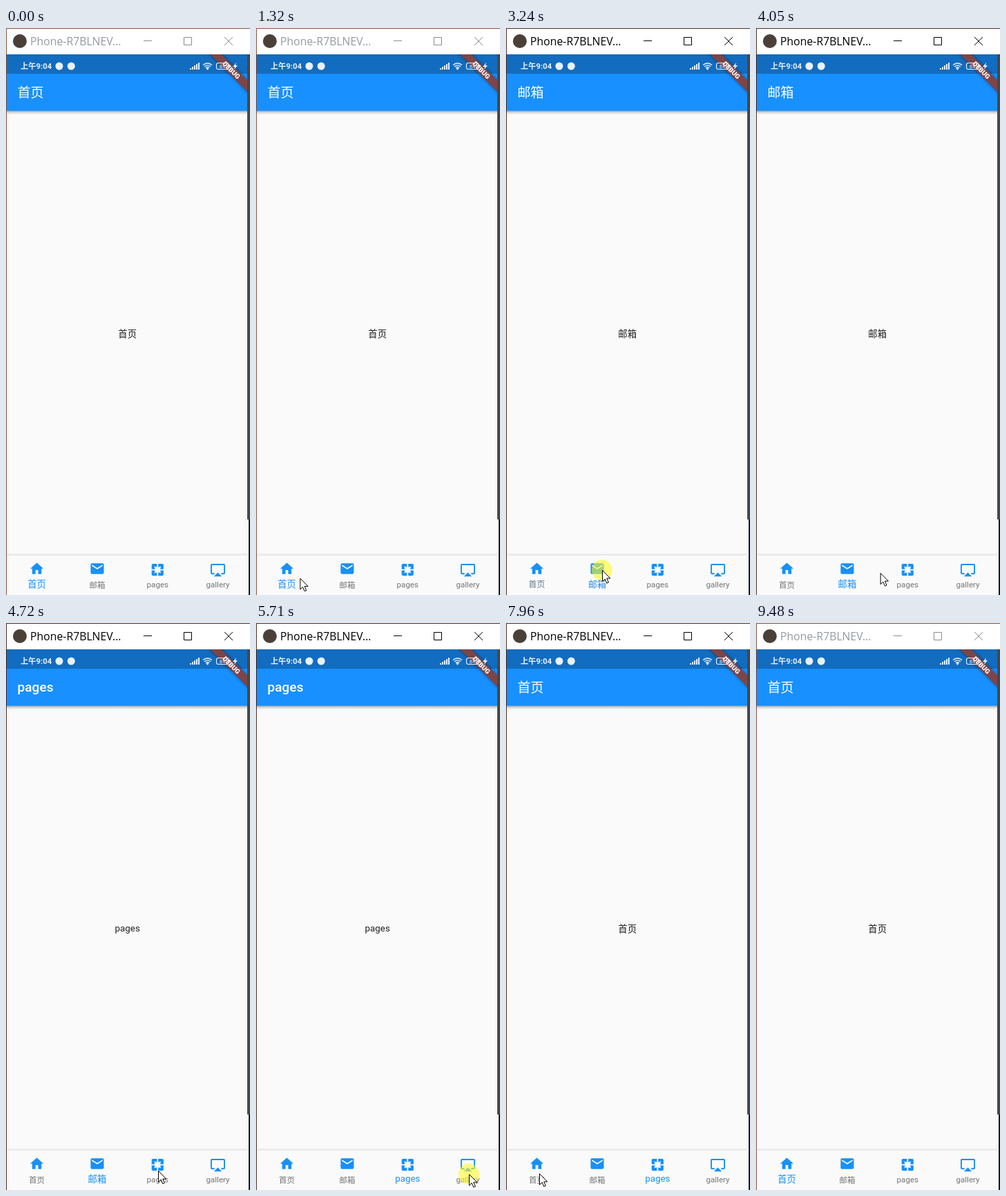
An HTML page for the animation above (9550 ms loop, 353 px wide and 818 px high).

```html
<!DOCTYPE html>
<html lang="zh">
<head>
<meta charset="utf-8">
<style>
  html, body { margin: 0; width: 100%; height: 100%; overflow: hidden; background: #fafafa; }
  svg { display: block; width: 100%; height: 100%; font-family: Roboto, "Noto Sans CJK SC", "Noto Sans CJK", sans-serif; }
  #caption { font-family: "Open Sans", "Noto Sans", sans-serif; }
  .mid { text-anchor: middle; }
</style>
</head>
<body>
<svg viewBox="0 0 353 818" xmlns="http://www.w3.org/2000/svg">
  <defs>
    <clipPath id="phone"><rect x="1" y="38" width="348" height="780"/></clipPath>
    <clipPath id="navClip"><rect x="1" y="761" width="349" height="57"/></clipPath>
    <linearGradient id="drop" x2="0" y2="1">
      <stop offset="0" stop-color="#000" stop-opacity=".36"/>
      <stop offset=".4" stop-color="#000" stop-opacity=".12"/>
      <stop offset="1" stop-color="#000" stop-opacity="0"/>
    </linearGradient>
    <linearGradient id="rise" x2="0" y2="1">
      <stop offset="0" stop-color="#000" stop-opacity="0"/>
      <stop offset="1" stop-color="#000" stop-opacity=".09"/>
    </linearGradient>
    <filter id="soft" x="-20%" y="-80%" width="140%" height="260%"><feGaussianBlur stdDeviation="2"/></filter>
  </defs>

  <rect width="353" height="818" fill="#fafafa"/>

  <!-- window frame -->
  <rect width="353" height="38" fill="#fff"/>
  <circle cx="20" cy="19" r="10" fill="#4a4038"/>
  <text id="caption" x="35" y="25" font-size="15.8">Phone-R7BLNEV...</text>
  <path id="buttons" fill="none" d="M199 18.5h12M257.5 13.5h11v11h-11zM316 13l12 12M328 13l-12 12"/>
  <rect x="349" y="38" width="4" height="671" fill="#45474a"/>
  <rect x="351" y="709" width="2" height="109" fill="#1c1a1b"/>
  <path id="frame" fill="none" d="M.5 818V.5H353"/>

  <!-- app bar -->
  <rect x="1" y="38" width="348" height="28" fill="#126cbf"/>
  <rect x="1" y="66" width="348" height="53.5" fill="#1890ff"/>
  <rect x="1" y="119.5" width="348" height="6" fill="url(#drop)"/>
  <text id="title" x="16.5" y="100" font-size="19.1" fill="#fff"></text>
  <text id="body" class="mid" x="175.7" y="446" font-size="13.4" fill="#212121"></text>

  <g clip-path="url(#phone)">
    <g transform="translate(349 38) rotate(45)">
      <rect x="-50" y="26.6" width="100" height="11.4" fill="#000" opacity=".5" filter="url(#soft)"/>
      <rect x="-50" y="26.6" width="100" height="11.4" fill="#7d4548"/>
      <text class="mid" y="35.8" font-size="9.7" font-weight="900" fill="#fff">DEBUG</text>
    </g>
  </g>

  <!-- status bar -->
  <g fill="#e9f2fb">
    <text x="21" y="59" font-size="11.3" font-weight="700">上午9:04</text>
    <circle cx="77" cy="55" r="5.5"/>
    <circle cx="94.3" cy="55" r="5.5"/>
    <path d="M266 58h2v2h-2zM269 56h2v4h-2zM272 54h2v6h-2zM275 52h2v8h-2zM278 50h2v10h-2z"/>
    <path d="M333 50l-5 6h3l-1 4 5-6h-3z"/>
    <path d="M323 53h1.5v4H323z"/>
    <circle cx="291.5" cy="59" r="1.4"/>
    <text class="mid" x="313" y="58" font-size="7.5">84</text>
  </g>
  <g fill="none" stroke="#e9f2fb" stroke-width="1.4">
    <path d="M285 53.5q6.5-5.5 13 0M287 55.7q4.500-3.700 9 0M289 57.700q2.500-2 5 0" />
    <rect x="304.500" y="50.500" width="17.500" height="9" rx="2.500" stroke-width="1.100"/>
  </g>

  <!-- bottom navigation -->
  <rect x="1" y="757" width="348" height="4" fill="url(#rise)"/>
  <rect x="1" y="761" width="349" height="57" fill="#fafafa"/>
  <circle id="ripple" cx="44.500" cy="790" fill="#000" clip-path="url(#navClip)"/>
  <g id="tabs"></g>

  <circle id="halo" r="15" fill="#fffa28" opacity=".6"/>
  <path id="cursor" d="M.5.5v16l3.700-3.500 2.600 6 2.600-1.100-2.600-5.900h5z" fill="#fff" stroke="#000"/>
</svg>

<script>
const LOOP = 9550;
const BLUE = [24, 144, 255], GREY = [117, 117, 117];
const $ = id => document.getElementById(id);

const tabs = [
  { text: '首页', x: 44.6, y: 780, d: 'M10 20v-6h4v6h5v-8h3L12 3 2 12h3v8z' },
  { text: '邮箱', x: 132, y: 780, d: 'M20 4H4c-1.1 0-2 .9-2 2v12c0 1.1.9 2 2 2h16c1.1 0 2-.9 2-2V6c0-1.1-.9-2-2-2zm0 4l-8 5-8-5V6l8 5 8-5z' },
  { text: 'pages', x: 219.3, y: 781.6, latin: true, d: 'M3 5v6h5L7 7l4 1V3H5c-1.1 0-2 .9-2 2zm5 8H3v6c0 1.1.9 2 2 2h6v-5l-4 1zm9 4l-4-1v5h6c1.1 0 2-.9 2-2v-6h-5zm2-14h-6v5l4-1-1 4h5V5c0-1.1-.9-2-2-2z' },
  { text: 'gallery', x: 306.5, y: 781.6, latin: true, d: 'M6 22h12l-6-6zM21 3H3c-1.1 0-2 .9-2 2v12c0 1.1.9 2 2 2h4v-2H3V5h18v12h-4v2h4c1.1 0 2-.9 2-2V5c0-1.1-.9-2-2-2z' }
];

// [time, tab] and [press, release]
const pages = [[0, 0], [3100, 1], [4720, 2], [6040, 3], [7030, 2], [7950, 0]];
const presses = [[1710, 1990], [2970, 3300], [4400, 4580], [5620, 5840], [6710, 6900], [7700, 7880]];

// [time, x, y] of the pointer tip
const path = [
  [650, 190, 814], [1450, 54, 792], [2000, 54, 792], [2250, 75, 786], [2510, 100, 784],
  [2710, 100, 784], [2960, 139, 782], [3710, 139, 782], [4390, 220, 790], [5180, 220, 790],
  [5600, 308, 795], [6250, 308, 795], [6700, 196, 798], [7330, 196, 798],
  [7690, 48, 794], [7960, 48, 794], [8290, 224, 818]
];

const clamp = v => Math.min(1, Math.max(0, v));
const mix = (a, b, k) => a + (b - a) * k;
const ease = k => k * k * (3 - 2 * k);
const ramp = (t, from, to) => clamp((t - from) / (to - from));

function set(el, attrs) {
  for (const key in attrs) el.setAttribute(key, attrs[key]);
}

function add(name, attrs) {
  const el = document.createElementNS('http://www.w3.org/2000/svg', name);
  set(el, attrs);
  return $('tabs').appendChild(el);
}

for (const tab of tabs) {
  add('path', {
    d: tab.d, fill: '#1890f5',
    transform: `translate(${tab.x} ${tab.y}) scale(.955) translate(-12 -12)`
  });
  tab.label = add('text', { class: 'mid', x: tab.x });
  tab.label.textContent = tab.text;
}

function pointer(t) {
  const i = path.findIndex(p => p[0] > t);
  if (i < 1) return path[0].slice(1);
  const [t0, x0, y0] = path[i - 1], [t1, x1, y1] = path[i];
  const k = ease(ramp(t, t0, t1));
  return [mix(x0, x1, k), mix(y0, y1, k)];
}

function drawTabs(t) {
  const n = pages.filter(p => p[0] <= t).length - 1;
  const [start, now] = pages[n];
  const before = n ? pages[n - 1][1] : now;
  const k = n ? ease(ramp(t, start + 30, start + 190)) : 1;

  $('title').textContent = $('body').textContent = tabs[now].text;
  set($('title'), { 'font-weight': tabs[now].latin ? 500 : 400, y: tabs[now].latin ? 99.3 : 100 });
  set($('body'), { y: tabs[now].latin ? 445 : 446 });

  tabs.forEach((tab, i) => {
    const on = i === now ? k : i === before ? 1 - k : 0;
    set(tab.label, {
      y: tab.latin ? mix(806.8, 806, on) : mix(807.6, 807, on),
      'font-size': mix(11.6, 13.4, on),
      fill: `rgb(${GREY.map((c, j) => Math.round(mix(c, BLUE[j], on)))})`
    });
  });
}

function render(t) {
  const active = t >= 1710 && t < 9480;
  set($('caption'), { fill: active ? '#000' : '#949ba3' });
  set($('buttons'), { stroke: active ? '#000' : '#8c8c8c' });
  set($('frame'), { stroke: active ? '#4a2c22' : '#80503c' });

  drawTabs(t);
  set($('ripple'), {
    r: mix(6, 34, ease(ramp(t, 1800, 2150))),
    opacity: t < 1800 ? 0 : .06 * (1 - ramp(t, 2260, 2510))
  });

  const [x, y] = pointer(t);
  const shown = t >= 650 && t < 8290;
  const pressed = presses.some(([a, b]) => t >= a && t < b);
  set($('cursor'), { transform: `translate(${x} ${y})`, visibility: shown ? 'visible' : 'hidden' });
  set($('halo'), { cx: x, cy: y, visibility: pressed ? 'visible' : 'hidden' });
}

const begin = performance.now();
function tick() {
  render((performance.now() - begin) % LOOP);
  requestAnimationFrame(tick);
}
tick();
</script>
</body>
</html>
```
